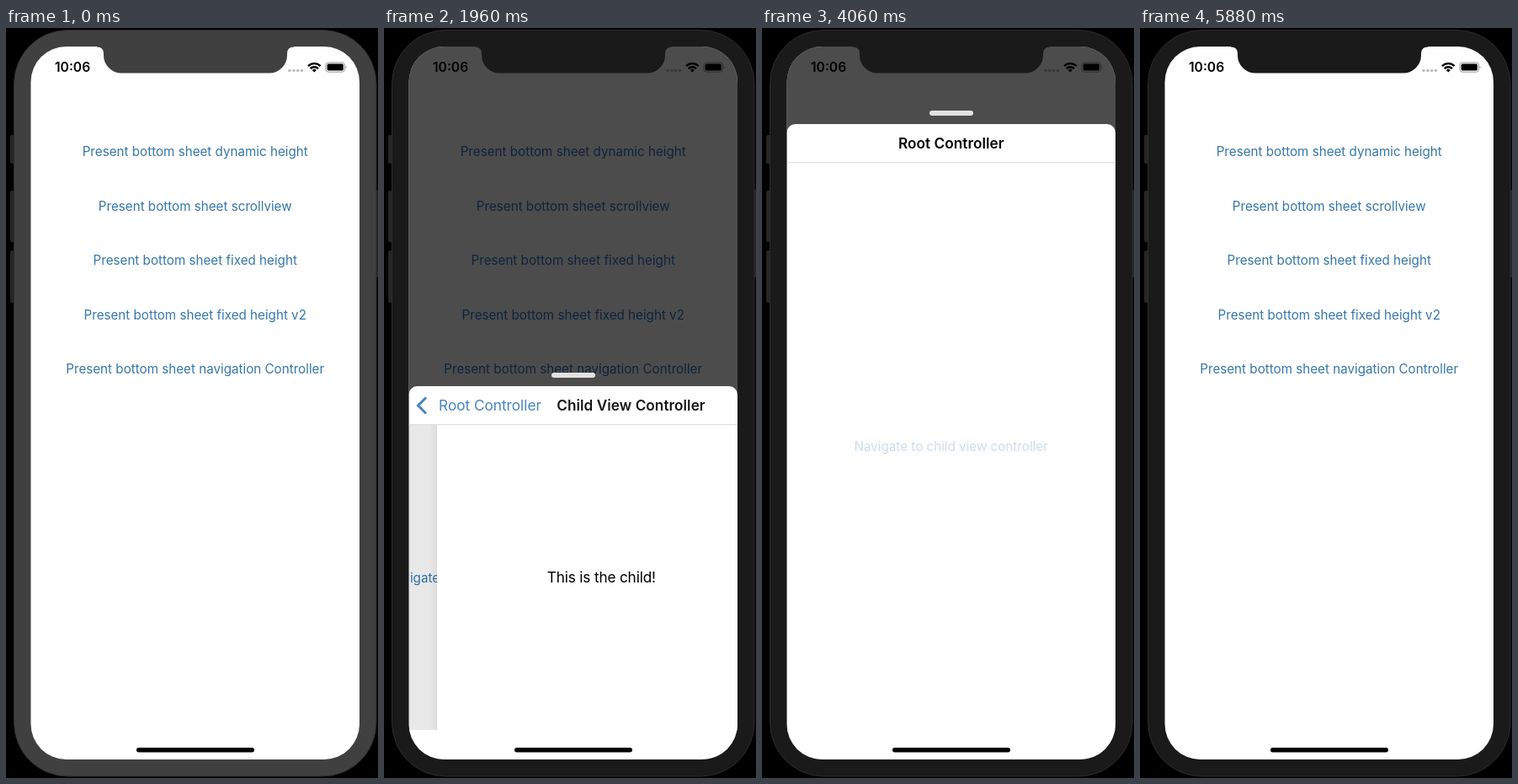
Write an HTML page that moves like this. It is 442 px wide and 890 px high and loops after 6.16 s.

```html
<!DOCTYPE html>
<html lang="en">
<head>
<meta charset="utf-8">
<style>
  html, body { margin: 0; width: 100%; height: 100%; overflow: hidden; background: #000; }
  svg { display: block; width: 442px; height: 890px; }
  text { font-family: Inter, Roboto, sans-serif; }
  .link { font-size: 15.2px; text-anchor: middle; }
  .bar { font-size: 17.2px; }
  .title { font-weight: 600; letter-spacing: .05px; }
  .mid { text-anchor: middle; }
</style>
</head>
<body>
<svg viewBox="0 0 442 890">
  <defs>
    <clipPath id="screen"><rect x="29.5" y="22" width="390.5" height="846" rx="42"/></clipPath>
    <clipPath id="area"><rect id="areaBox" x="29.5" y="46" width="390.5"/></clipPath>
    <linearGradient id="edge"><stop stop-opacity="0"/><stop offset="1" stop-opacity=".05"/></linearGradient>
  </defs>
  <rect width="442" height="890"/>
  <g fill="#262626">
    <rect x="5" y="127" width="8" height="34" rx="2"/>
    <rect x="5" y="193" width="8" height="61" rx="2"/>
    <rect x="5" y="264" width="8" height="62" rx="2"/>
    <rect x="436" y="192" width="7" height="104" rx="2"/>
  </g>
  <rect id="body" x="9.5" y="2.5" width="430.5" height="885.5" rx="64" stroke="#2c2c2c"/>

  <g clip-path="url(#screen)">
    <rect x="29" y="22" width="392" height="847" fill="#fff"/>
    <text x="58" y="52" font-size="15.6" font-weight="600">10:06</text>
    <g fill="#bdbdbd">
      <circle cx="337" cy="50.5" r="1.8"/><circle cx="342" cy="50.5" r="1.8"/>
      <circle cx="346.7" cy="50.5" r="1.8"/><circle cx="351.5" cy="50.5" r="1.8"/>
    </g>
    <g fill="none" stroke="#000" stroke-width="2.4">
      <path d="M359 45.2a10.3 10.3 0 0 1 14.6 0M361.7 48.2a6.5 6.5 0 0 1 9.2 0"/>
      <path d="M366.3 52.6l-2.6-2.6a3.7 3.7 0 0 1 5.2 0z" fill="#000" stroke="none"/>
    </g>
    <rect x="380" y="41" width="22.5" height="11.2" rx="3" fill="none" stroke="#999"/>
    <rect x="381.6" y="42.6" width="19.3" height="8" rx="1.7"/>
    <path d="M403.7 44.6q1.8 2 0 4z" fill="#999"/>
    <g id="links"></g>
    <rect id="dim" x="29" y="22" width="392" height="847"/>

    <g id="sheet">
      <rect x="199" y="-16" width="52" height="6" rx="3" fill="#e2e2e2"/>
      <rect x="29.5" width="390.5" height="900" rx="10" fill="#fff"/>
      <g clip-path="url(#area)">
        <text id="action" class="link">Navigate to child view controller</text>
        <rect id="shade" x="29" y="46" width="392" height="800"/>
        <g id="child">
          <rect x="20" y="46" width="9.5" height="800" fill="url(#edge)"/>
          <rect x="29.5" y="46" width="392" height="800" fill="#fff"/>
          <text id="note" class="bar mid" x="224.7" letter-spacing="-.15">This is the child!</text>
        </g>
      </g>
      <path d="M29.5 45.7h391" stroke="#d9d9d9"/>
      <text id="rootTitle" class="bar title" y="29">Root Controller</text>
      <g id="back">
        <path d="M50 13.5L40.5 23L50 32.5" fill="none" stroke-width="3" stroke="currentColor"/>
        <text id="backText" class="bar" y="29" fill="currentColor">Root Controller</text>
      </g>
      <text id="childTitle" class="bar title mid" y="29">Child View Controller</text>
    </g>
    <rect x="155" y="854" width="140" height="5.5" rx="2.7"/>
  </g>
  <path id="notch" d="M108 21v1.5q8 0 8 8v2a21 21 0 0 0 21 21h176a21 21 0 0 0 21-21v-2q0-8 8-8v-1.5z"/>
</svg>
<script>
const LOOP = 6160, STEP = 70, HALF = 425, FULL = 114, OFF = 890;
const $ = id => document.getElementById(id);
const set = (id, attrs) => { for (const k in attrs) $(id).setAttribute(k, attrs[k]); };
const ramp = (t, from, to) => Math.min(1, Math.max(0, (t - from) / (to - from)));
const mix = (a, b, p) => a + (b - a) * p;
const inOut = u => u < .5 ? 2 * u * u : 1 - 2 * (1 - u) ** 2;
const spring = (t, start) => {
  const x = Math.max(0, t - start) * .017;
  return 1 - (1 + x) * Math.exp(-x);
};
// Opacity of a tapped button: drops at once, then recovers.
const tap = (t, down, up, end) => t < down ? 1 : mix(.25, 1, ramp(t, up, end));

['dynamic height', 'scrollview', 'fixed height', 'fixed height v2', 'navigation Controller'].forEach((name, i) => {
  $('links').innerHTML += `<text class="link" x="224.7" y="${152 + i * 64.6}">Present bottom sheet ${name}</text>`;
});

function draw(t) {
  const frame = t < 140 ? '#404040' : '#1a1a1a';
  set('body', { fill: frame });
  set('notch', { fill: frame });

  const dim = t < 600 ? .7 * (1 - (1 - ramp(t, 270, 560)) ** 2) : .7 * (1 - ramp(t, 5530, 5880));
  set('dim', { opacity: dim });
  const fading = t > 5390 && t < 5700;
  set('links', { fill: fading ? '#5f7fa3' : dim > 0 ? '#2f76c8' : '#3577ab' });
  $('links').lastChild.setAttribute('opacity', tap(t, 140, 280, 560));

  // Resting position of the sheet, then its slide in and out.
  const rest = mix(HALF, FULL, spring(t, 3182));
  let top = rest;
  if (t < 600) top = mix(OFF, rest, inOut(ramp(t, 261, 560)));
  if (t > 5200) top = mix(rest, OFF, inOut(ramp(t, 5290, 5649)));
  set('sheet', { transform: `translate(0 ${top})`, opacity: top < OFF ? 1 : 0 });
  set('areaBox', { height: 787 - rest });
  const textY = (879 - rest) / 2 + 5.7;

  // Navigation progress: 0 shows the root, 1 the child.
  const p = t < 2600 ? spring(t, 1720) : t < 4100 ? 1 - spring(t, 2630) : spring(t, 4170);
  const pressed = t < 2600 ? tap(t, 1610, 1750, 1960) : tap(t, 4060, 4200, 4410);
  set('action', { x: 224.7 - 117 * p, y: textY, fill: '#3579b5', opacity: t < 450 ? 0 : pressed });
  set('shade', { opacity: .1 * p });
  set('child', { transform: `translate(${391 * (1 - p)} 0)`, opacity: p > .001 ? 1 : 0 });
  set('note', { y: textY + .5 });

  const titleX = mix(162, 56, p);
  set('rootTitle', { x: titleX, opacity: Math.max(0, 1 - p * 1.4) });
  set('backText', { x: titleX });
  const held = t >= 2450 && t < 3000 ? (t < 2520 ? .6 : .25) : 1;
  set('back', { color: fading ? '#35607f' : '#3579bd', opacity: p * held });
  set('childTitle', { x: 272 + 250 * (1 - p), opacity: p });
}

function tick() {
  const t = performance.now() % LOOP;
  draw(Math.floor(t / STEP) * STEP);
  requestAnimationFrame(tick);
}
tick();
</script>
</body>
</html>
```
